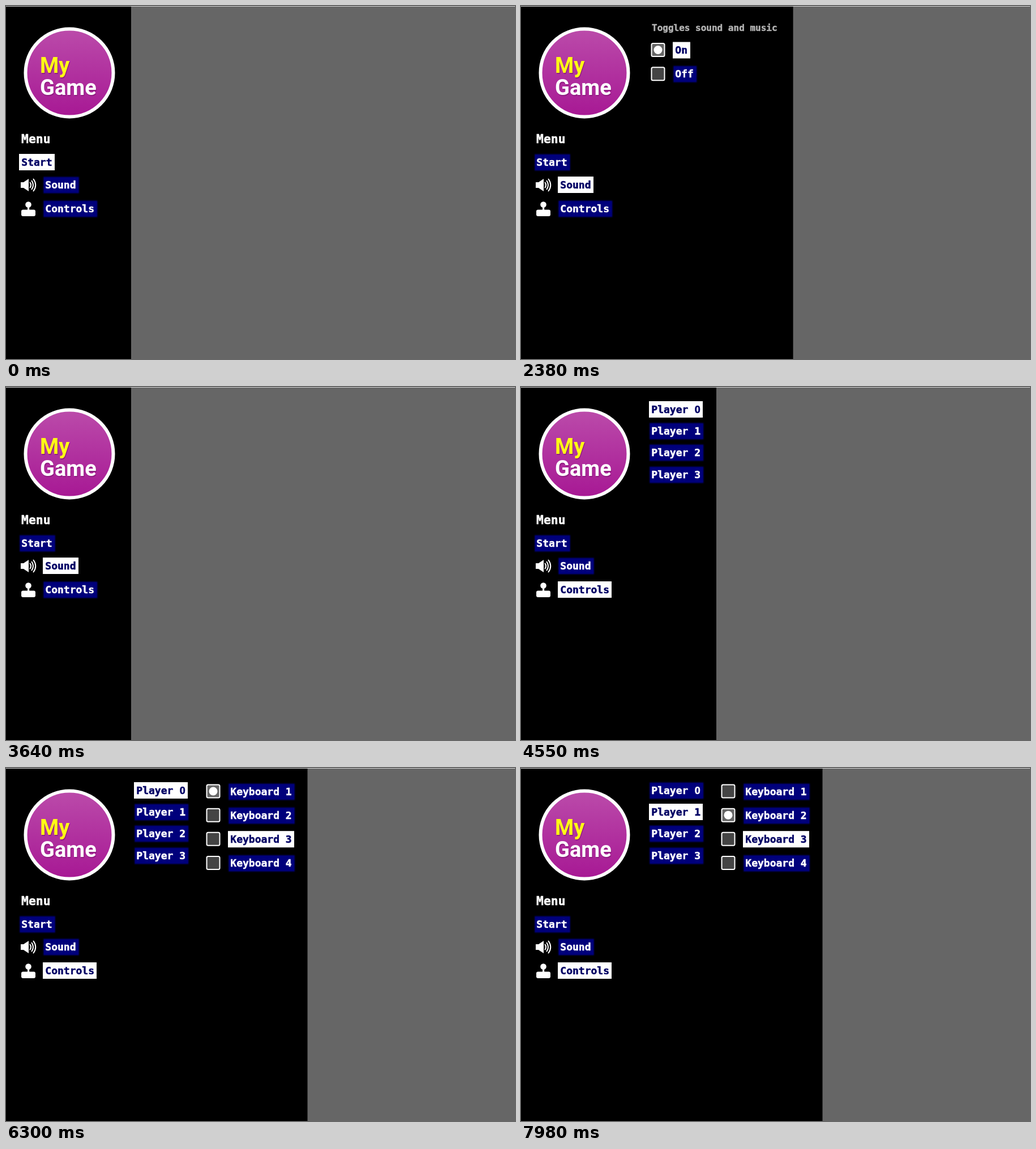
An HTML page that plays this animation: 899x623 px, repeating every 8000 ms.

```html
<!DOCTYPE html>
<html lang="en">
<head>
<meta charset="utf-8">
<title>Game menu</title>
<style>
  html, body { margin: 0; width: 100%; height: 100%; overflow: hidden; background: #666; }
  svg { display: block; width: 899px; height: 623px; }
  text { font: bold 18px "DejaVu Sans Mono", monospace; white-space: pre; }
  .heavy { stroke: currentColor; stroke-width: .5; fill: currentColor; }
  .zero { font-family: "Liberation Sans", sans-serif; }
  .badge { font: bold 38px Roboto, sans-serif; }
</style>
</head>
<body>
<svg viewBox="0 0 899 623" xmlns="http://www.w3.org/2000/svg">
  <defs>
    <linearGradient id="pink" x1="0" y1="0" x2="0" y2="1">
      <stop offset="0" stop-color="#bb4baa"/>
      <stop offset="1" stop-color="#a71894"/>
    </linearGradient>
    <filter id="soft" x="-10%" y="-20%" width="120%" height="140%">
      <feGaussianBlur stdDeviation="0.9"/>
    </filter>
  </defs>
  <rect width="899" height="623" fill="#666"/>
  <rect id="panel" width="221" height="623"/>
  <rect width="899" height="1" fill="#d4d4d4"/>

  <circle cx="112" cy="118" r="77.5" fill="url(#pink)" stroke="#fff" stroke-width="6"/>
  <g fill="#7d1470" opacity=".6" transform="translate(1 1.5)">
    <text class="badge" x="60" y="118">My</text>
    <text class="badge" x="60" y="157">Game</text>
  </g>
  <text class="badge" x="60" y="118" fill="#ffff14">My</text>
  <text class="badge" x="60" y="157" fill="#fff">Game</text>

  <text class="heavy" x="27" y="242" color="#fff" style="font-size:21.4px">Menu</text>

  <g fill="#fff">
    <path d="M26 311H31L40 305V327L31 321H26Z"/>
    <path d="M42.5 311.5Q45.5 316 42.5 320.5M45.5 308.5Q50.5 316 45.5 323.5M48.5 305.5Q56 316 48.5 326.5"
      fill="none" stroke="#fff" stroke-width="2" stroke-linecap="round"/>
    <circle cx="39.5" cy="350.5" r="5.3"/>
    <rect x="38" y="353" width="3.2" height="9"/>
    <rect x="27" y="359.5" width="25" height="11.5" rx="3"/>
  </g>

  <g id="main"></g>
  <g id="sound">
    <text class="heavy" x="231" y="44" color="#b2b2b2" style="font-size:16px">Toggles sound and music</text>
  </g>
  <g id="players"></g>
  <g id="keys"></g>
</svg>
<script>
const LOOP = 8000;
const NS = "http://www.w3.org/2000/svg";
const $ = id => document.getElementById(id);

function add(parent, tag, attrs) {
  const el = document.createElementNS(NS, tag);
  for (const k in attrs) el.setAttribute(k, attrs[k]);
  parent.appendChild(el);
  return el;
}

function show(el, on) {
  el.style.display = on ? "" : "none";
}

// Returns a setter that switches the highlight
function button(parent, label, x, y) {
  const w = label.length * 10.8 + 9;
  const g = add(parent, "g", {});
  const off = add(g, "g", {});
  add(off, "rect", { x: x + 1, y: y + .5, width: w, height: 29, fill: "#00006a", filter: "url(#soft)" });
  add(off, "rect", { x: x + 2, y: y + 1.5, width: w - 2, height: 27, fill: "#00007b" });
  const on = add(g, "rect", { x, y, width: Math.round(w), height: 29, fill: "#fff" });
  const text = add(g, "text", { x: x + 4.3, y: y + 20.5, class: "heavy" });
  if (label.endsWith("0")) {
    text.textContent = label.slice(0, -1);
    add(text, "tspan", { class: "zero", dx: .5 }).textContent = "0";
  } else {
    text.textContent = label;
  }
  return active => {
    show(on, active);
    show(off, !active);
    text.setAttribute("color", active ? "#000064" : "#fff");
  };
}

// Returns a setter that switches the round mark
function checkbox(parent, cx, cy) {
  const box = add(parent, "rect", {
    x: cx - 11.5, y: cy - 11.5, width: 23, height: 23, rx: 2.5,
    stroke: "#fff", "stroke-width": 2
  });
  const dot = add(parent, "circle", { cx, cy, r: 7.5, fill: "#fff" });
  return checked => {
    box.setAttribute("fill", checked ? "#666" : "#444");
    show(dot, checked);
  };
}

const pick = (setters, index) => setters.forEach((set, i) => set(i === index));

const mainItems = [
  button($("main"), "Start", 23, 261),
  button($("main"), "Sound", 65, 301),
  button($("main"), "Controls", 65, 343)
];
const soundItems = ["On", "Off"].map((s, i) => button($("sound"), s, 268, 63.5 + i * 41.7));
const soundMarks = [0, 1].map(i => checkbox($("sound"), 242, 77.5 + i * 42.2));

const rows = [0, 1, 2, 3];
const playerItems = rows.map(i => button($("players"), "Player " + i, 226, 25 + Math.floor(i * 38.4)));
const keyItems = rows.map(i => button($("keys"), "Keyboard " + (i + 1), 392, 27 + i * 42.1));
const keyMarks = rows.map(i => checkbox($("keys"), 366, 41 + i * 42.15));

const widths = { none: 221, sound: 480.6, players: 345, keys: 532.5 };

// Each step changes part of the menu state
const steps = [
  [0, { main: 0, open: "none", sound: 0, soundMark: 0, player: 0, key: 0, keyMark: 0 }],
  [1960, { main: 1 }],
  [2380, { open: "sound" }],
  [2800, { sound: 1 }],
  [3150, { soundMark: 1 }],
  [3640, { open: "none" }],
  [4270, { main: 2 }],
  [4550, { open: "players" }],
  [5250, { open: "keys" }],
  [5810, { key: 1 }],
  [6300, { key: 2 }],
  [6650, { keyMark: 2 }],
  [7140, { open: "players" }],
  [7630, { player: 1 }],
  [7910, { open: "keys", keyMark: 1 }]
];

function stateAt(t) {
  return Object.assign({}, ...steps.filter(s => s[0] <= t).map(s => s[1]));
}

function draw(t) {
  const s = stateAt(t);
  $("panel").setAttribute("width", widths[s.open]);
  show($("sound"), s.open === "sound");
  show($("players"), s.open === "players" || s.open === "keys");
  show($("keys"), s.open === "keys");
  pick(mainItems, s.main);
  pick(soundItems, s.sound);
  pick(soundMarks, s.soundMark);
  pick(playerItems, s.player);
  pick(keyItems, s.key);
  pick(keyMarks, s.keyMark);
}

const start = performance.now();
function frame() {
  draw((performance.now() - start) % LOOP);
  requestAnimationFrame(frame);
}
frame();
</script>
</body>
</html>
```
